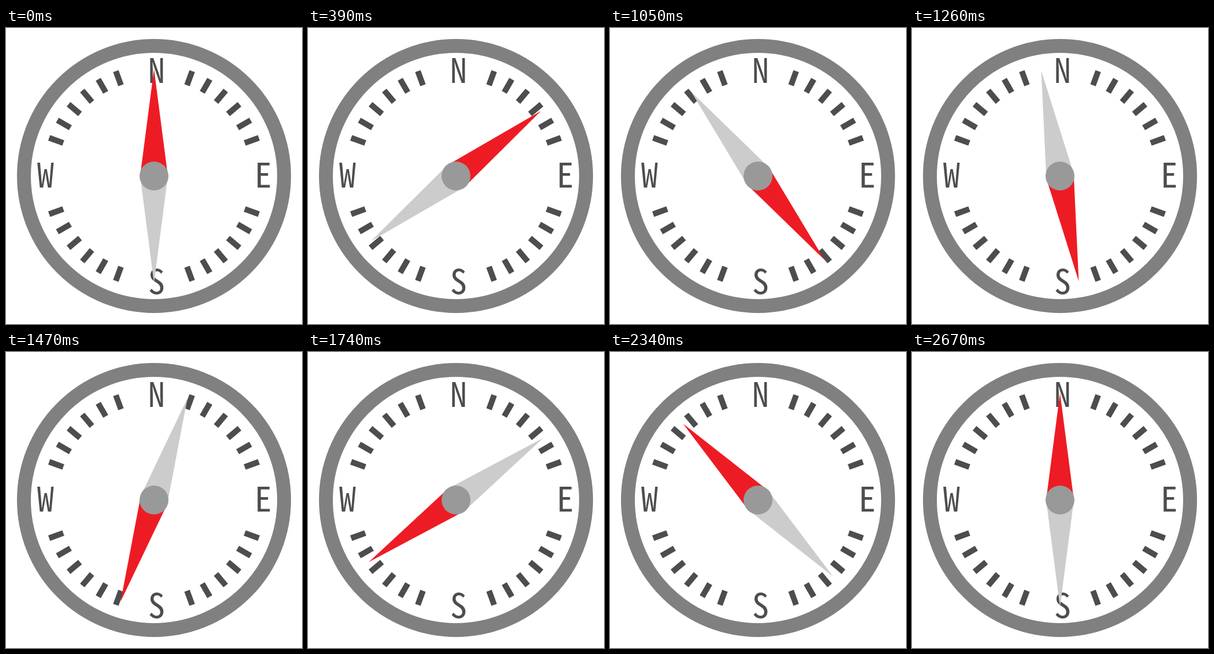
These frames come from a looping animation (512x512 px, 2.7 s). An HTML page:

```html
<!DOCTYPE html>
<html lang="en">
<head>
<meta charset="utf-8">
<title>Compass</title>
<style>
  html, body { margin: 0; width: 100%; height: 100%; overflow: hidden; background: #fff; }
  svg { display: block; width: 100%; height: 100%; }
  text {
    font: 58.5px "Noto Sans Mono CJK JP", "Noto Sans CJK JP", "Noto Sans Mono", monospace;
    font-feature-settings: "hwid";
    text-anchor: middle;
  }
</style>
</head>
<body>
<svg viewBox="0 0 512 512">
  <circle cx="256" cy="256" r="225" fill="#fff" stroke="#808080" stroke-width="24"/>
  <g id="ticks" transform="translate(256 256)" fill="#4d4d4d"></g>
  <g fill="#4d4d4d">
    <text x="260.5" y="95">N</text>
    <text x="445" y="276">E</text>
    <text x="260.5" y="460">S</text>
    <text x="68.5" y="276">W</text>
  </g>
  <g transform="translate(256 256)">
    <g id="needle">
      <path d="M-24 0L0 185L24 0z" fill="#ccc"/>
      <path d="M-24 0L0 -185L24 0z" fill="#ed1c24"/>
    </g>
    <circle r="25" fill="#999"/>
  </g>
</svg>
<script>
  const LOOP = 2700, STEP = 30;
  const ticks = document.getElementById('ticks');
  const needle = document.getElementById('needle');

  // Six ticks per quadrant, leaving room for the letters
  let marks = '';
  for (let quarter = 0; quarter < 360; quarter += 90)
    for (let a = 20; a <= 70; a += 10)
      marks += `<rect x="167" y="-5" width="26" height="10" transform="rotate(${quarter + a})"/>`;
  ticks.innerHTML = marks;

  // The first and last steps both point north
  function draw() {
    const step = Math.floor(performance.now() % LOOP / STEP);
    needle.setAttribute('transform', `rotate(${step * 360 / (LOOP / STEP - 1)})`);
    requestAnimationFrame(draw);
  }
  draw();
</script>
</body>
</html>
```
